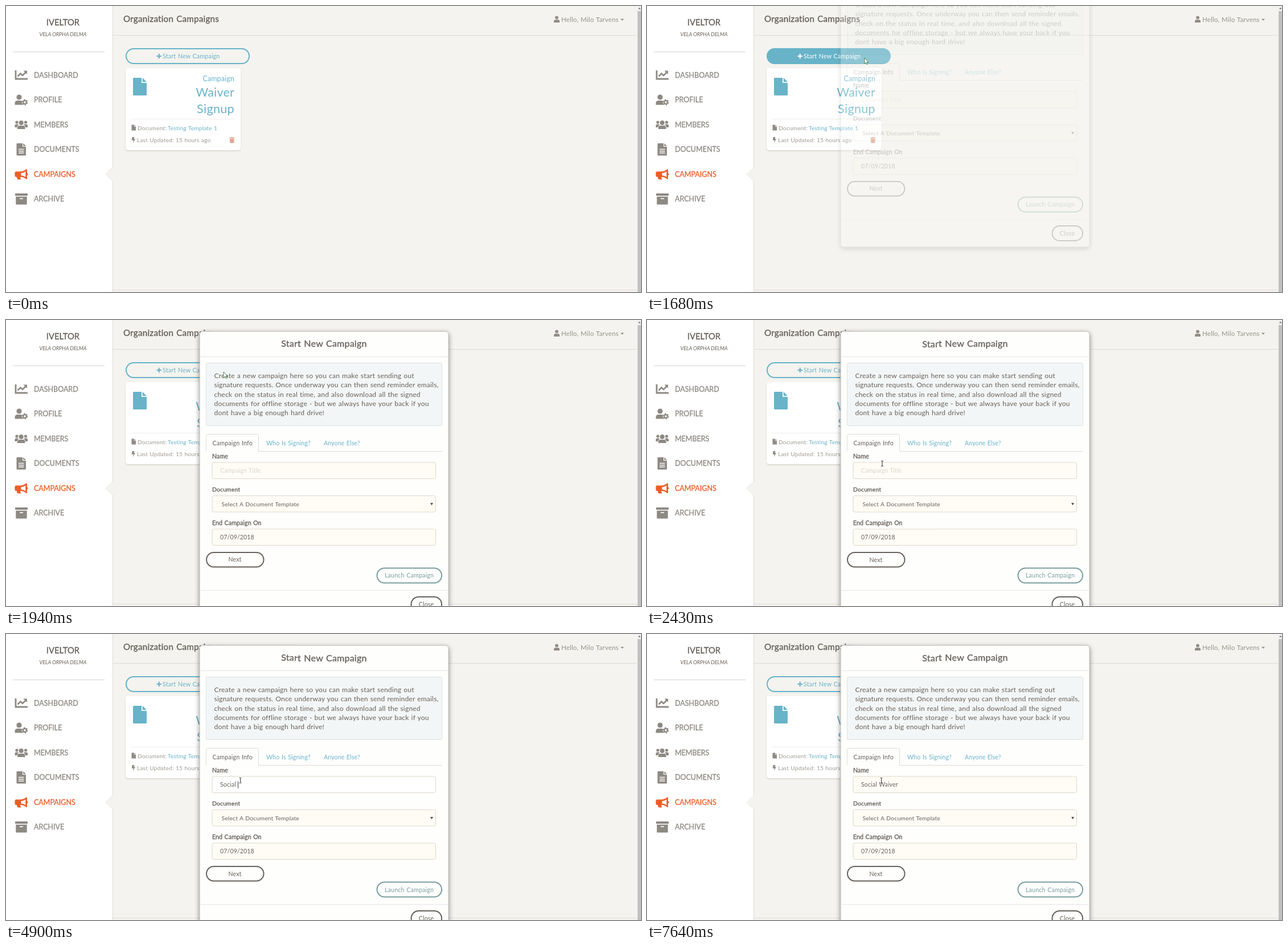
Recreate the animation shown at these times as an HTML page. Size 1115 px wide and 502 px high, loop 8000 ms.

```html
<!DOCTYPE html>
<html lang="en">
<head>
<meta charset="utf-8">
<title>Campaigns</title>
<style>
html, body { margin: 0; width: 100%; height: 100%; overflow: hidden; background: #f4f3ef; }
svg { display: block; }
text { font: 10.5px Lato, "Open Sans", sans-serif; letter-spacing: .015em; word-spacing: .06em; fill: #66615b; white-space: pre; }
.semi { stroke: #66615b; stroke-width: .35px; }
.mid { text-anchor: middle; }
.end { text-anchor: end; }
.rule { stroke: #dddbd6; fill: none; }
.nav text { font-size: 12.5px; letter-spacing: 0; fill: currentColor; stroke: currentColor; stroke-width: .3px; }
.nav { color: #8d8983; }
.nav .on { color: #eb5e28; }
.ico { fill: currentColor; }
.line { fill: none; stroke: currentColor; }
.blue { fill: #68b3c8; }
.soft { fill: #a09b94; }
.small text { font-size: 10.2px; }
.copy text { font-size: 12.07px; }
.field { fill: #fffcf5; stroke: #ddd8c9; }
.pill { fill: none; stroke: #66615b; stroke-width: 2; }
</style>
</head>
<body>
<svg width="1115" height="502" viewBox="0 0 1115 502">
  <defs>
    <filter id="drop" x="-10%" y="-10%" width="120%" height="120%">
      <feDropShadow dx="0" dy="3" stdDeviation="4" flood-color="#000" flood-opacity=".45"/>
    </filter>
    <filter id="lift" x="-5%" y="-5%" width="110%" height="112%">
      <feDropShadow dx="0" dy="1.5" stdDeviation=".9" flood-color="#ccc5b9" flood-opacity=".7"/>
    </filter>
  </defs>

  <rect width="1115" height="502" fill="#f4f3ef"/>
  <path class="rule" d="M188 51.5H1108M188 498.5H1108"/>

  <!-- sidebar -->
  <rect width="187" height="502" fill="#fff"/>
  <path class="rule" d="M187.5 0V502"/>
  <path d="M188 283L175 295.5L188 308Z" fill="#f4f3ef"/>
  <path class="rule" d="M187.5 283L175 295.5L187.5 308" stroke-opacity=".6"/>
  <text class="semi mid" x="100" y="33.7" style="font-size:14.8px;letter-spacing:0">IVELTOR</text>
  <text class="mid" x="100" y="53" style="font-size:9.1px;letter-spacing:0;word-spacing:0;font-style:italic">VELA ORPHA DELMA</text>
  <path class="rule" d="M12 80.5H173" style="stroke:#d3d1cd"/>

  <g class="nav">
    <g>
      <path class="line" stroke-width="2.8" d="M17 113V128H38"/>
      <path class="line" stroke-width="2.6" d="M20.5 123.5L25.5 118.5L29 122L35 116"/>
      <path class="ico" d="M30.5 113.5H37V120Z"/>
      <text x="49" y="125.7">DASHBOARD</text>
    </g>
    <g>
      <circle class="ico" cx="23" cy="160" r="4.6"/>
      <path class="ico" d="M15.5 173.5V171Q15.5 166 20.5 166H26Q28 166 28 168Q27.500 172 30 173.500Z"/>
      <circle class="line" cx="33" cy="169" r="2.9" stroke-width="2.2"/>
      <circle class="line" cx="33" cy="169" r="4.5" stroke-width="1.8" stroke-dasharray="2.3 2.412"/>
      <text x="49" y="169.2">PROFILE</text>
    </g>
    <g class="ico">
      <circle cx="19" cy="204" r="2.6"/><circle cx="34.500" cy="204" r="2.6"/><circle cx="26.7" cy="205" r="4"/>
      <path d="M15.500 213V210Q15.500 207.500 18 207.500H20.500Q21.500 207.500 22.500 208.300Q19.500 210 19.300 213ZM38 213V210Q38 207.500 35.500 207.500H33Q32 207.500 31 208.300Q34 210 34.200 213ZM20 216V213.500Q20 210 23.500 210H30Q33.500 210 33.500 213.500V216Z"/>
      <text x="49" y="212.7">MEMBERS</text>
    </g>
    <g>
      <path class="ico" d="M19.500 241H29V247H35V261.500Q35 262.500 34 262.500H19.500Q18.500 262.500 18.500 261.500V242Q18.500 241 19.500 241ZM30.200 241L35 245.800H30.200Z"/>
      <path d="M22 251.500H31.500M22 254.800H31.500M22 258H31.500" stroke="#fff" stroke-width="1.400"/>
      <text x="49" y="256.2">DOCUMENTS</text>
    </g>
    <g class="on">
      <path class="ico" fill-rule="evenodd" d="M18 290.500H25Q31 290.500 35.500 286.500Q37 286 37 287.500V293Q38.500 294 38.500 295.300Q38.500 296.600 37 297.500V303Q37 304.500 35.500 304Q31 300 25.500 300Q24.500 302 26.500 304.500H20.500Q18.500 302 19 300H18Q15.500 300 15.500 297.500V293Q15.500 290.500 18 290.500ZM34.300 290.500Q30.500 293 26.500 293.200V297.500Q30.500 297.700 34.300 300.200Z"/>
      <text x="49" y="299.700">CAMPAIGNS</text>
    </g>
    <g>
      <path class="ico" d="M17 329H37Q38 329 38 330V333H16V330Q16 329 17 329ZM17.300 334.500H36.700V347.500Q36.700 348.500 35.700 348.500H18.300Q17.300 348.500 17.300 347.500Z"/>
      <path d="M24 338.200H30" stroke="#fff" stroke-width="1.600"/>
      <text x="49" y="343.200">ARCHIVE</text>
    </g>
  </g>

  <!-- page -->
  <text class="semi" x="206" y="28.300" style="font-size:15.2px">Organization Campaigns</text>
  <g fill="#928d86">
    <circle cx="967" cy="20.300" r="2.900"/>
    <path d="M962 29V27Q962 24 965 24H969Q972 24 972 27V29Z"/>
    <path d="M1079 22.500H1085L1082 25.700Z"/>
  </g>
  <text x="975" y="27.700" style="font-size:11.500px;fill:#98928b">Hello, Milo Tarvens</text>

  <g id="start">
    <rect id="startBox" x="211" y="75" width="216" height="26" rx="13" fill="#68b3c8" stroke="#68b3c8" stroke-width="2"/>
    <path class="line" stroke-width="2.200" d="M264.500 88H273M268.700 83.700V92.300"/>
    <text x="275" y="91.800" style="font-size:10.700px;fill:currentColor">Start New Campaign</text>
  </g>

  <rect x="210" y="109" width="202" height="144" rx="4.500" fill="#fff" filter="url(#lift)"/>
  <path class="blue" d="M224.500 126H238V135H247V155.500Q247 157 245.500 157H224.500Q223 157 223 155.500V127.500Q223 126 224.500 126ZM239.700 126L247 133.300H239.700Z"/>
  <text class="blue end" x="401" y="132.300" style="font-size:12.400px">Campaign</text>
  <text class="blue end" x="401" y="158.700" style="font-size:21.200px">Waiver</text>
  <text class="blue end" x="401" y="187.700" style="font-size:21.500px">Signup</text>
  <path d="M220 198.500H401" stroke="#eeece8"/>
  <g class="small">
    <path fill="#8f8b84" d="M220.500 208.500H225V212H228V218.500H220.500ZM225.800 208.500L228 211.200H225.800Z"/>
    <text class="soft" x="231" y="217.500">Document:</text>
    <text class="blue" x="284" y="217.500">Testing Template 1</text>
    <path fill="#8f8b84" d="M221.500 230H225.500L224.500 233.300H227L222.800 240.500L223.700 235.800H220.800Z"/>
    <text class="soft" x="230" y="239.200">Last Updated: 15 hours ago</text>
    <path fill="#dfa595" d="M392 231H395L395.500 230H398L398.500 231H401.500V232.500H392ZM392.800 233.300H400.700L400.200 240.500H393.300Z"/>
  </g>

  <rect x="1108" width="7" height="502" fill="#f1f1f1"/>
  <rect x="1109" y="9" width="6" height="493" fill="#c1c1c1"/>
  <path d="M1110 5.500L1112.300 2.500L1114.600 5.500Z" fill="#777"/>

  <!-- dialog -->
  <g id="modal" opacity="0">
    <rect x="340" y="20" width="437" height="503" rx="5" fill="#fefefd" stroke="#a9a8a5" stroke-width=".8" filter="url(#drop)"/>
    <text class="semi mid" x="558.500" y="47.500" style="font-size:16px">Start New Campaign</text>
    <path class="rule" d="M340.500 64.500H776.500M340.500 474.500H776.500" style="stroke:#e6e5e3"/>
    <rect x="351.500" y="75.500" width="414" height="110" rx="2.500" fill="#f3f6f6" stroke="#dde2e2"/>
    <g class="copy">
      <text x="365.500" y="102">Create a new campaign here so you can make start sending out</text>
      <text x="365.500" y="118.300">signature requests. Once underway you can then send reminder emails,</text>
      <text x="365.500" y="134.600">check on the status in real time, and also download all the signed</text>
      <text x="365.500" y="150.900">documents for offline storage - but we always have your back if you</text>
      <text x="365.500" y="167.200">dont have a big enough hard drive!</text>
    </g>
    <path class="rule" d="M351.500 230.500V203.500Q351.500 200.500 354.500 200.500H440.500Q443.500 200.500 443.500 203.500V230.500H766"/>
    <text x="362.500" y="220" style="font-size:10.700px">Campaign Info</text>
    <text class="blue" x="457" y="220" style="font-size:10.650px">Who Is Signing?</text>
    <text class="blue" x="558" y="220">Anyone Else?</text>

    <text class="semi" x="362" y="242.700">Name</text>
    <rect class="field" id="nameBox" x="362" y="250" width="392.500" height="28.500" rx="3"/>
    <text id="hint" x="376" y="268.400" style="fill:#d8d5cf">Campaign Title</text>
    <text id="typed" x="376" y="268.400"></text>
    <path id="caret" d="M.5 258.500V271" stroke="#444"/>

    <text class="semi" x="362" y="301.200" style="font-size:10.400px">Document</text>
    <rect class="field" x="362" y="308.500" width="392.500" height="28.500" rx="3"/>
    <text x="378.500" y="326.800" style="font-size:10.350px">Select A Document Template</text>
    <path d="M745 321H750L747.500 325.500Z" fill="#555"/>

    <text class="semi" x="362" y="359.700">End Campaign On</text>
    <rect class="field" x="362" y="367" width="392.500" height="28.500" rx="3"/>
    <text x="376" y="385.200">07/09/2018</text>

    <rect class="pill" x="352" y="408" width="100.500" height="25.500" rx="12.700"/>
    <text class="mid" x="402" y="424.500">Next</text>
    <rect class="pill" x="651.500" y="435.500" width="113.500" height="26" rx="13" style="stroke:#7a9e9f"/>
    <text class="mid" x="708" y="452.500" style="font-size:10.700px;fill:#7a9e9f">Launch Campaign</text>
    <rect class="pill" x="711.500" y="486" width="53.500" height="26" rx="13"/>
    <text class="mid" x="738" y="502.700">Close</text>
  </g>

  <path id="arrow" d="M0 0V10.200L2.400 8.200L4 11.600L5.500 10.900L4 7.600H7Z" fill="#fff" stroke="#3c7a48" stroke-width=".9"/>
  <path id="beam" d="M-2 -4.500H-.7L0 -4L.7 -4.500H2M0 -4V4M-2 4.500H-.7L0 4L.7 4.500H2" fill="none" stroke="#333"/>
</svg>

<script>
const LOOP = 8000, OPEN = 1642, FOCUS = 2930, BLUR = 7540;
const $ = id => document.getElementById(id);
const clamp = v => Math.max(0, Math.min(1, v));
const ramp = (t, from, ms) => clamp((t - from) / ms);
const smooth = u => u * u * (3 - 2 * u);
const settle = u => 1 - (1 - u) ** 2;

// time, x, y, easing on the way there
const path = [
  [130, 1045, 512],
  [180, 1031, 490, smooth],
  [380, 527, 185, settle],
  [530, 527, 185, smooth],
  [1130, 382, 91, smooth],
  [1950, 382, 91, smooth],
  [2230, 425, 182, smooth],
  [2430, 413, 252, settle],
  [2580, 413, 252, smooth],
  [2730, 411.5, 257, smooth]
];

// time, letters shown
const keys = [
  [FOCUS, 0], [3280, 1], [3530, 2], [3760, 3], [3810, 4], [3910, 5], [3960, 6],
  [4900, 7], [5790, 8], [5990, 9], [6190, 10], [6290, 11], [6440, 12], [6540, 13]
];
const NAME = "Social Waiver";

// cubic-bezier(0, 0, .58, 1)
function easeOut(x) {
  let lo = 0, hi = 1;
  for (let i = 0; i < 20; i++) {
    const s = (lo + hi) / 2;
    if (1.74 * (1 - s) * s * s + s ** 3 < x) lo = s; else hi = s;
  }
  return lo * lo * (3 - 2 * lo);
}

function pointer(t) {
  const i = path.findIndex(p => p[0] > t);
  if (i === 0) return path[0].slice(1, 3);
  if (i < 0) return path[path.length - 1].slice(1, 3);
  const [t0, x0, y0] = path[i - 1], [t1, x1, y1, ease] = path[i];
  const u = ease((t - t0) / (t1 - t0));
  return [x0 + (x1 - x0) * u, y0 + (y1 - y0) * u];
}

function drawPointer(t) {
  const [x, y] = pointer(t), inField = y > 240 && t > 2230;
  const at = `translate(${x} ${y})`;
  $("arrow").setAttribute("transform", at);
  $("beam").setAttribute("transform", at);
  $("arrow").style.display = inField ? "none" : "";
  $("beam").style.display = inField ? "" : "none";
}

function drawButton(t) {
  const h = ramp(t, 960, 150) * (1 - ramp(t, 1685, 150));
  const mix = c => Math.round(c + (255 - c) * h);
  $("startBox").setAttribute("fill-opacity", h);
  $("start").style.color = `rgb(${mix(104)},${mix(179)},${mix(200)})`;
}

function drawModal(t) {
  const drop = -126 * (1 - easeOut(ramp(t, OPEN, 300)));
  $("modal").setAttribute("transform", `translate(0 ${drop})`);
  $("modal").setAttribute("opacity", ramp(t, OPEN, 150));
}

function drawField(t) {
  const key = keys.filter(k => k[0] <= t).pop() || [0, 0];
  const focus = t >= FOCUS && t < BLUR;
  const lit = focus && Math.floor((t - key[0]) / 500) % 2 === 0;
  const typed = $("typed");
  typed.textContent = NAME.slice(0, key[1]);
  $("hint").style.display = key[1] ? "none" : "";
  $("nameBox").style.fill = focus ? "#fff" : "";
  $("caret").style.display = lit ? "" : "none";
  const x = Math.round(376 + (key[1] ? typed.getComputedTextLength() : 0));
  $("caret").setAttribute("transform", `translate(${x} 0)`);
}

function frame() {
  const t = performance.now() % LOOP;
  drawPointer(t);
  drawButton(t);
  drawModal(t);
  drawField(t);
  requestAnimationFrame(frame);
}
frame();
</script>
</body>
</html>
```
